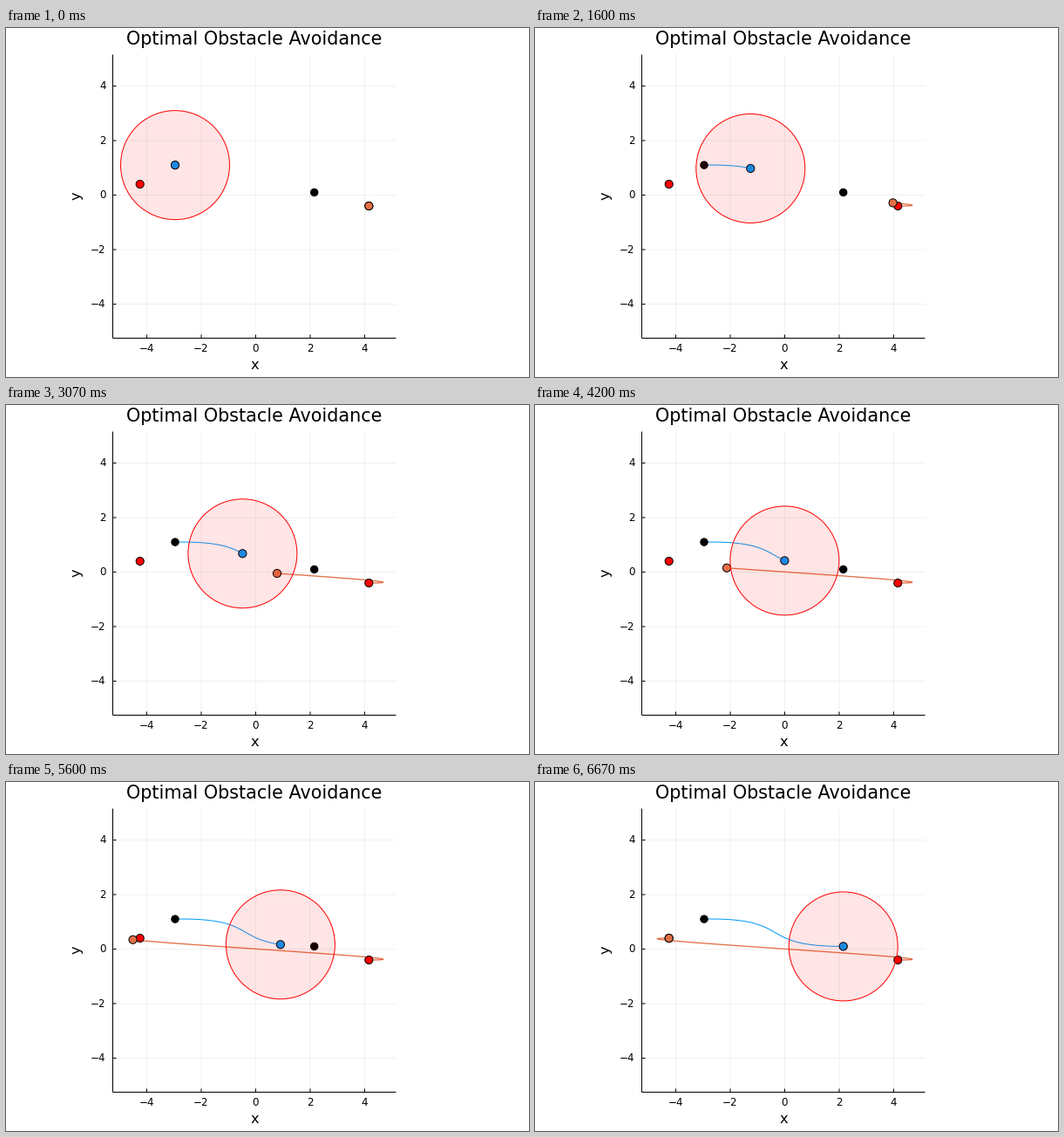
Write a matplotlib script that moves like this. It is 600x400 px and loops after 6.74 s.

```python
import matplotlib.pyplot as plt
import numpy as np
from matplotlib.animation import FuncAnimation
from matplotlib.patches import Circle

W, H, DPI = 600, 400, 100
LOOP, TICK = 6740, 20
RATE = 15
LAST = 100
LEFT, RIGHT, TOP, BOTTOM = 122.5, 447.5, 30.5, 355.5
X0, Y0, UNIT = 286.5, 191.5, 31.24
PX = 72 / DPI
BLUE, ORANGE = "#009afa", "#e36f47"
TICKS = (-4, -2, 0, 2, 4)

plt.rcParams["font.family"] = "DejaVu Sans"
plt.rcParams["toolbar"] = "None"


def agent_path(k):
    w = (k - 50) / 50
    x = -0.375 + 1.352 * w - 0.030 * w**2 + 1.204 * w**3
    y = 0.618 - 0.7775 * w - 0.018 * w**2 + 0.2766 * w**3
    return x, y


def rival_path(k):
    v = (k - 50.48) / 50
    s = k / 100
    return -8.790 * v + 4.586 * v**3, -0.4 + 0.8 * s**2 * (3 - 2 * s)


fig = plt.figure(figsize=(W / DPI, H / DPI), dpi=DPI, facecolor="white")
ax = fig.add_axes([LEFT / W, 1 - BOTTOM / H,
                   (RIGHT - LEFT) / W, (BOTTOM - TOP) / H])
ax.patch.set_visible(False)
ax.set_xlim((LEFT - X0) / UNIT, (RIGHT - X0) / UNIT)
ax.set_ylim((Y0 - BOTTOM) / UNIT, (Y0 - TOP) / UNIT)
ax.set_xticks([])
ax.set_yticks([])
for side in ax.spines.values():
    side.set_visible(False)


def rule(x1, y1, x2, y2, z, **kw):
    """Straight one-pixel line in data units, kept off the pixel grid."""
    ax.plot([x1, x2], [y1, y2], color="black", lw=PX, snap=False,
            solid_capstyle="butt", clip_on=False, zorder=z, **kw)


def label(x, y, text, size, ha="center", **kw):
    fig.text(x / W, 1 - y / H, text, fontsize=size * PX, ha=ha,
             va="baseline", **kw)


def dot(x, y, color, size, z):
    return ax.add_patch(Circle((x, y), size / 2 / UNIT, fc=color, ec="black",
                               lw=PX, zorder=z, clip_on=False))


label(285, 19, "Optimal Obstacle Avoidance", 20.8)
label(285, 391, "x", 16.3)
label(86, 192.5, "y", 16.3, rotation=90, rotation_mode="anchor")

(xa, xb), (ya, yb) = ax.get_xlim(), ax.get_ylim()
mark = 4 / UNIT
for t in TICKS:
    rule(t, ya, t, yb, 1, alpha=0.055)
    rule(xa, t, xb, t, 1, alpha=0.055)
    rule(t, ya, t, ya + mark, 2)
    rule(xa, t, xa + mark, t, 2)
    name = str(t).replace("-", "\u2212")
    label(X0 + t * UNIT - 0.4, 371, name, 11.9)
    label(114.5, Y0 - t * UNIT + 3.9, name, 11.9, ha="right")
rule(xa, ya, xb, ya, 2)
rule(xa, ya, xa, yb, 2)

for path, color, size in ((agent_path, "black", 8.4), (rival_path, "red", 9.1)):
    for k in (0, LAST):
        dot(*path(k), color, size, 4)

movers = []
for path, color, width in ((agent_path, BLUE, 1), (rival_path, ORANGE, 1.3)):
    trail, = ax.plot([], [], color=color, lw=width * PX, zorder=3)
    movers.append((path, trail, dot(0, 0, color, 9.2, 5)))

# The safety zone lies above everything, tinting what it covers.
fill = Circle((0, 0), 2, fc="red", ec="none", alpha=0.1, zorder=6)
ring = Circle((0, 0), 2, fc="none", ec="red", lw=PX, zorder=7)
ax.add_patch(fill)
ax.add_patch(ring)


def update(i):
    # Steps run at RATE per second, switching on the nearest tick.
    k = min(LAST, (i * TICK + TICK // 2) * RATE // 1000)
    steps = np.arange(k + 1)
    for path, trail, head in movers:
        xs, ys = path(steps)
        trail.set_data(xs, ys)
        head.center = xs[-1], ys[-1]
    for zone in (fill, ring):
        zone.center = agent_path(k)
    return []


anim = FuncAnimation(fig, update, frames=LOOP // TICK, interval=TICK,
                     init_func=lambda: update(0), repeat=True, repeat_delay=0)
plt.show()
```
